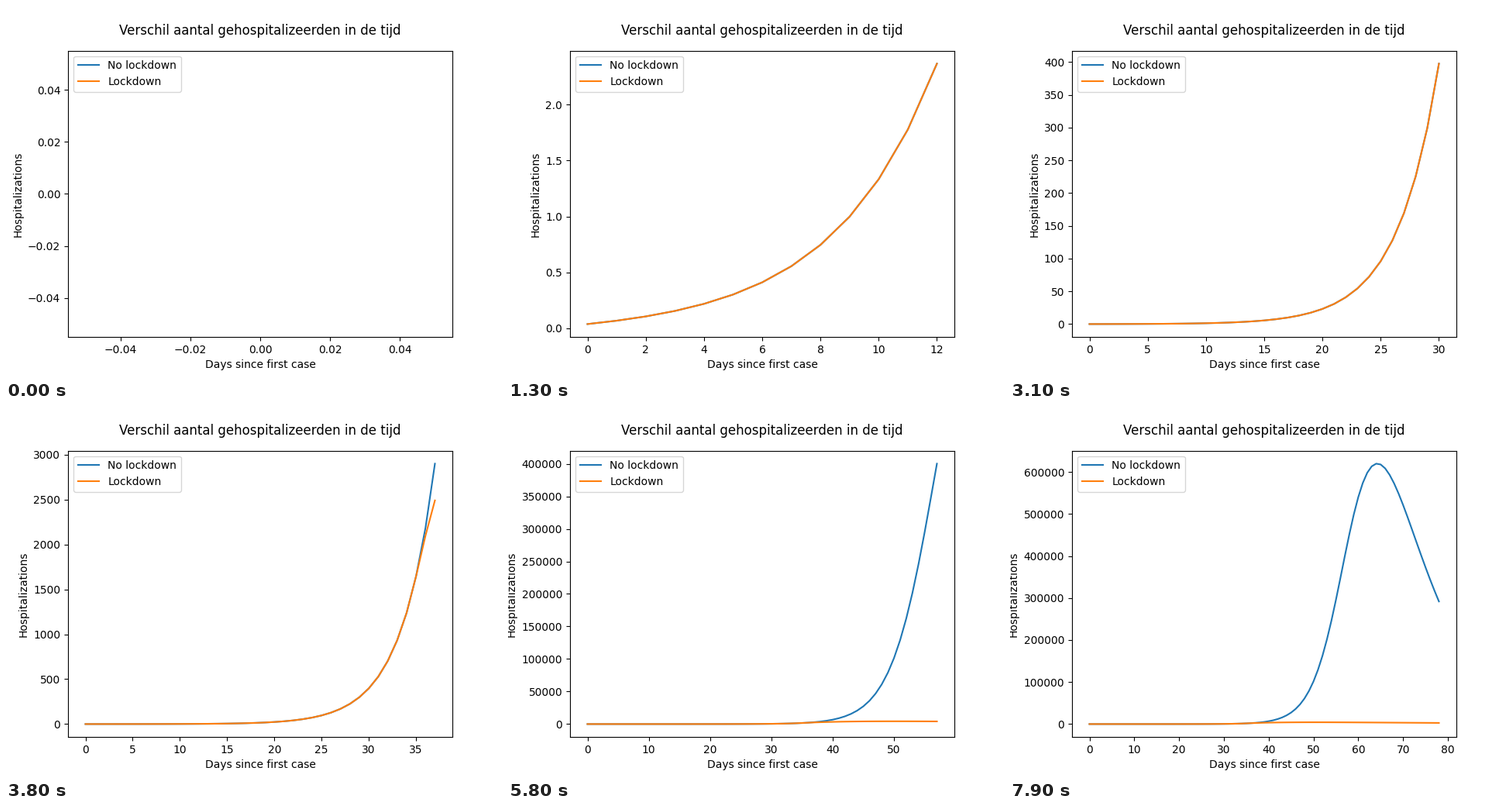
These frames come from a looping animation (640 by 480 pixels, 8000 ms). A matplotlib script:

```python
import matplotlib.pyplot as plt
import numpy as np
from matplotlib.animation import FuncAnimation

FRAMES = 80
INTERVAL = 100
STEPS = 500  # integration steps per day

AT_RISK = 982_000  # people who would need a hospital bed once infected
CONTACT = 0.6845
CONTACT_LOCKED = 0.378
RECOVERY = 0.4
DISCHARGE = 0.11
LOCKDOWN_DAY = 35.1


def hospitalized(lockdown):
    """Daily hospital occupancy of an epidemic with delayed discharge."""
    susceptible, infected, beds = AT_RISK, 0.0309, 0.037
    daily = []
    for step in range(FRAMES * STEPS):
        if step % STEPS == 0:
            daily.append(beds)
        locked = lockdown and step >= LOCKDOWN_DAY * STEPS
        contact = CONTACT_LOCKED if locked else CONTACT
        new = contact * infected * susceptible / AT_RISK
        beds += (infected - DISCHARGE * beds) / STEPS
        infected += (new - RECOVERY * infected) / STEPS
        susceptible -= new / STEPS
    return np.array(daily)


days = np.arange(FRAMES)
curves = {
    "No lockdown": hospitalized(lockdown=False),
    "Lockdown": hospitalized(lockdown=True),
}

fig, ax = plt.subplots(figsize=(6.4, 4.8), dpi=100)


def draw(n):
    ax.clear()
    for label, values in curves.items():
        ax.plot(days[:n], values[:n], label=label)
    ax.set_title("Verschil aantal gehospitalizeerden in de tijd", pad=15)
    ax.set_xlabel("Days since first case")
    ax.set_ylabel("Hospitalizations")
    ax.legend(loc="upper left")


anim = FuncAnimation(fig, draw, frames=FRAMES, interval=INTERVAL,
                     repeat=True, repeat_delay=0)
plt.show()
```
